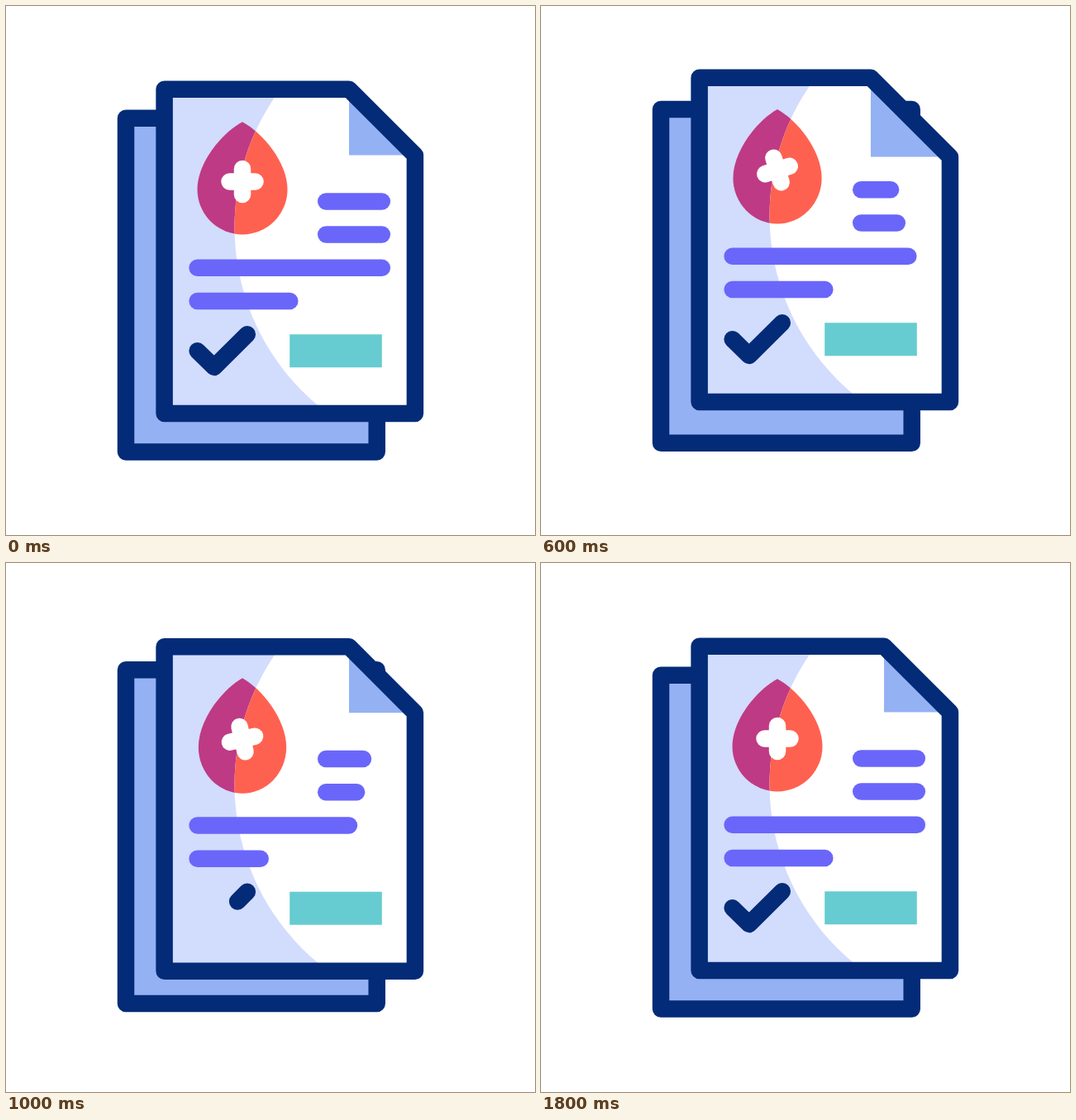
These frames come from a looping animation (640 px wide and 640 px high, 2.04 s). An HTML page:

```html
<!DOCTYPE html>
<html lang="en">
<head>
<meta charset="utf-8">
<title>Medical report</title>
<style>
  html, body { margin: 0; width: 100%; height: 100%; overflow: hidden; background: #fff; }
  svg { display: block; width: 100vw; height: 100vh; }
  .outline, .bar, #check, #cross { stroke-width: 20.5; stroke-linecap: round; stroke-linejoin: round; }
  .outline, #check { fill: none; stroke: #032b77; }
  .bar { stroke: #6a66fa; }
  #cross { fill: none; stroke: #fff; }
</style>
</head>
<body>
<svg viewBox="0 0 640 640">
  <defs>
    <clipPath id="lit"><circle cx="556.5" cy="268" r="280"/></clipPath>
    <path id="drop" d="M286 140.3C262 153 231.5 189 231.5 222A54.5 54.5 0 0 0 340.5 222C340.5 189 310 153 286 140.3Z"/>
    <path id="sheet"/>
  </defs>
  <g id="back">
    <path class="outline" style="fill:#94b1f3" d="M145 135.7H448.7V539.4H145Z"/>
  </g>
  <g id="front">
    <use href="#sheet" fill="#d2dcfd"/>
    <use href="#drop" fill="#be3a84"/>
    <g clip-path="url(#lit)">
      <use href="#sheet" fill="#fff"/>
      <use href="#drop" fill="#ff6150"/>
    </g>
    <path id="fold" fill="#94b1f3"/>
    <use href="#sheet" class="outline"/>
    <path id="cross" d="M286 197V228M270.5 212.5H301.5"/>
    <line class="bar" x1="387.2" y1="236.4" y2="236.4"/>
    <line class="bar" x1="387.2" y1="276.6" y2="276.6"/>
    <line class="bar" x1="231.6" y1="316.8" y2="316.8"/>
    <line class="bar" x1="231.6" y1="357" y2="357"/>
    <path id="check"/>
    <path fill="#66ccd1" d="M343.2 397.2H454.8V437.2H343.2Z"/>
  </g>
</svg>
<script>
const LOOP = 2040, STEP = 40;
const $ = id => document.getElementById(id);
const set = (el, name, value) => el.setAttribute(name, value);
const clamp = p => Math.min(1, Math.max(0, p));
const smooth = p => p * p * (3 - 2 * p);

// Cubic Bezier easing, solved for x by bisection.
function bezier(x1, y1, x2, y2) {
  const at = (a, b, s) => 3 * a * s * (1 - s) ** 2 + 3 * b * s * s * (1 - s) + s ** 3;
  return p => {
    let lo = 0, hi = 1;
    for (let i = 0; i < 24; i++) {
      const mid = (lo + hi) / 2;
      if (at(x1, x2, mid) < p) lo = mid; else hi = mid;
    }
    return at(y1, y2, hi);
  };
}

function tween(t, from, to, ease = smooth) {
  return ease(clamp((t - from) / (to - from)));
}

// Keys are [time, value] pairs.
function track(keys, t) {
  let value = keys[0][1];
  for (let i = 1; i < keys.length; i++) {
    value += (keys[i][1] - keys[i - 1][1]) * tween(t, keys[i - 1][0], keys[i][0]);
  }
  return value;
}

const backY = [[40, 0], [280, 11], [520, -17.5], [760, 9], [1000, -6.5], [1320, 1], [1560, 0]];
const frontY = [[160, 0], [400, 9.5], [630, -15.2], [880, 7.6], [1120, -6.3], [1440, 1], [1680, 0]];
const foldSize = [[80, 0], [440, 27.5], [800, 0]];
const squash = [[50, 0], [390, 0.096], [755, -0.088], [1130, 0]];
const spin = bezier(0.54, 0, 0.46, 1);
const penDown = bezier(0.25, 0.1, 0.667, 1);

const bars = [...document.querySelectorAll('.bar')];
const barEnds = [454.8, 454.8, 454.8, 343.3];
const barStarts = [240, 310, 428, 598];

const checkPoints = [[231.6, 417.2], [251.8, 437], [291.8, 397.2]];
const corner = 0.338; // share of the check's length before its corner

function checkAt(u) {
  const [a, b, q] = u < corner
    ? [checkPoints[0], checkPoints[1], u / corner]
    : [checkPoints[1], checkPoints[2], (u - corner) / (1 - corner)];
  return [a[0] + (b[0] - a[0]) * q, a[1] + (b[1] - a[1]) * q];
}

function checkPath(from, to) {
  if (to - from < 0.001) return '';
  const points = [checkAt(from)];
  if (from < corner && to > corner) points.push(checkPoints[1]);
  points.push(checkAt(to));
  return 'M' + points.join('L');
}

function draw(t) {
  set($('back'), 'transform', `translate(0 ${track(backY, t)})`);
  set($('front'), 'transform', `translate(0 ${track(frontY, t)})`);

  const f = track(foldSize, t), x = 415 - f, y = 180.5 + f;
  set($('sheet'), 'd', `M191.6 100.7H${x}L494.9 ${y}V493H191.6Z`);
  set($('fold'), 'd', `M${x} 100.7V${y}H494.9Z`);

  const s = track(squash, t);
  set($('drop'), 'transform', `translate(286 208.6) scale(${1 + s} ${1 - s}) translate(-286 -208.6)`);
  set($('cross'), 'transform', `rotate(${360 * tween(t, 80, 1600, spin)} 286 212.5)`);

  bars.forEach((bar, i) => {
    const start = barStarts[i];
    const shrink = track([[start, 0], [start + 520, 41], [start + 1040, 0]], t);
    set(bar, 'x2', barEnds[i] - shrink);
  });

  set($('check'), 'd', t < 1100
    ? checkPath(tween(t, 745, 1100), 1)
    : checkPath(0, tween(t, 1100, 1800, penDown)));
}

const begin = performance.now();
function tick() {
  const t = (performance.now() - begin) % LOOP;
  draw(Math.floor(t / STEP) * STEP);
  requestAnimationFrame(tick);
}
tick();
</script>
</body>
</html>
```
